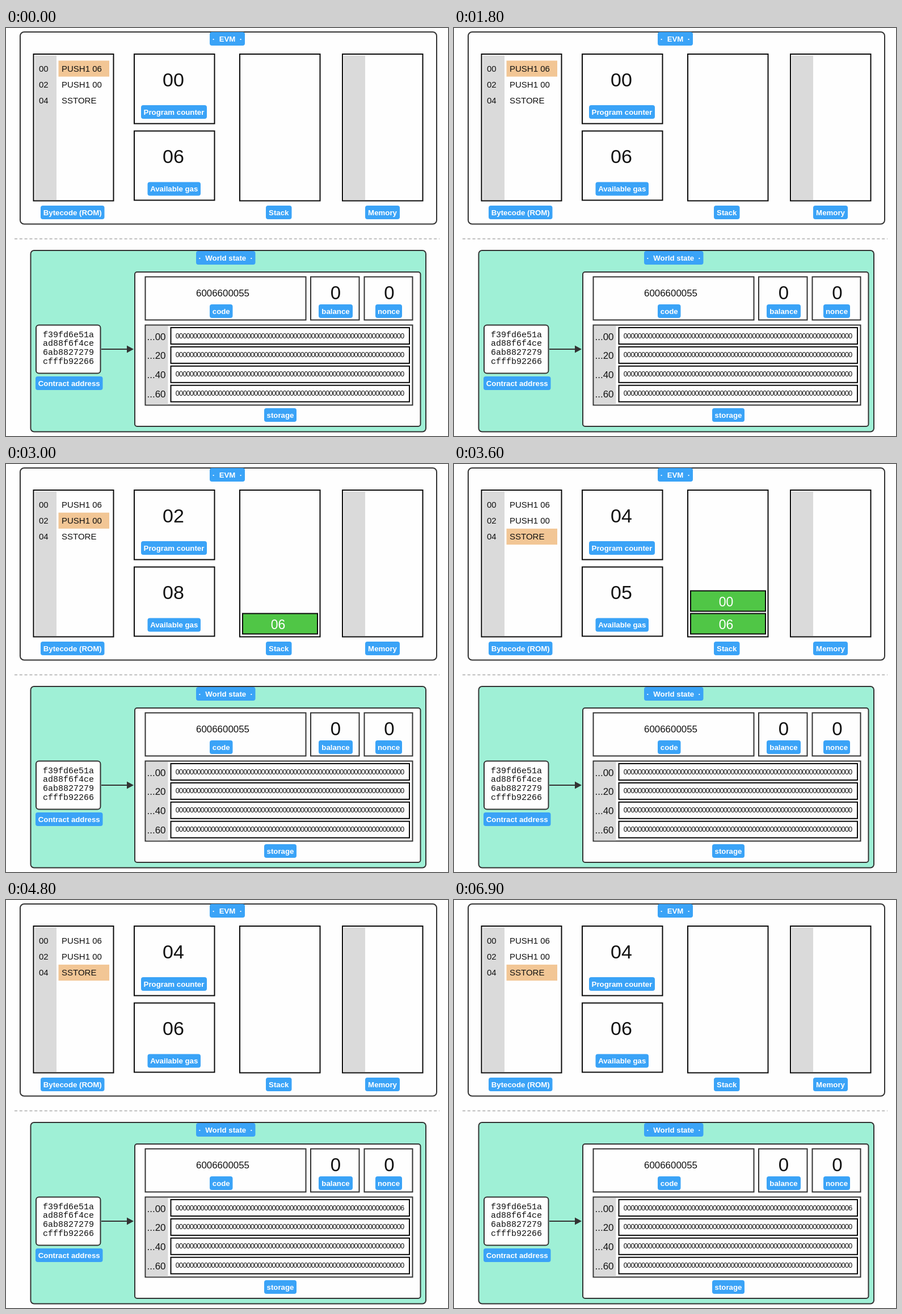
An HTML page that plays this animation: 779x719 px, repeating every 7000 ms.

```html
<!DOCTYPE html>
<html lang="en">
<head>
<meta charset="utf-8">
<title>EVM storage write</title>
<style>
  html, body { margin: 0; width: 100%; height: 100%; overflow: hidden; background: #fefefe; }
  svg { display: block; width: 779px; height: 719px; font-family: "Liberation Sans", Arial, sans-serif; }
  text { fill: #111; white-space: pre; }
  .box { fill: #fefefe; stroke: #0a0a0a; stroke-width: 2; }
  .soft { stroke: #333; }
  .world { fill: #9ff0d6; }
  .gutter { fill: #dadada; }
  .tag rect { fill: #3aa3f7; }
  .tag text { fill: #fff; font-size: 13.25px; font-weight: bold; text-anchor: middle; }
  .op { font-size: 15px; }
  .big { font-size: 34px; text-anchor: middle; }
  .mid { font-size: 33px; text-anchor: middle; }
  .code { font-size: 16.9px; text-anchor: middle; }
  .slot { font-size: 17px; }
  .word { font-size: 12.45px; letter-spacing: -.05em; }
  .addr { font: 15px "Liberation Mono", "Courier New", monospace; }
  .mark { fill: #f2c695; }
  .item rect { fill: #50c646; stroke: #0a0a0a; stroke-width: 2; }
  .item text { fill: #fff; font-size: 23px; text-anchor: middle; }

  .step { opacity: 0; animation: 7s step-end infinite; }
  .s0 { animation-name: s0; }
  .s1 { animation-name: s1; }
  .s2 { animation-name: s2; }
  .s3 { animation-name: s3; }
  @keyframes s0 { 0% { opacity: 1 } 32.857%, 100% { opacity: 0 } }
  @keyframes s1 { 0% { opacity: 0 } 32.857% { opacity: 1 } 44.286%, 100% { opacity: 0 } }
  @keyframes s2 { 0% { opacity: 0 } 44.286% { opacity: 1 } 55.714%, 100% { opacity: 0 } }
  @keyframes s3 { 0% { opacity: 0 } 55.714%, 100% { opacity: 1 } }
</style>
</head>
<body>
<svg id="stage" viewBox="0 0 779 719"></svg>
<script>
const rect = (x, y, w, h, cls, r = 0) =>
  `<rect x="${x}" y="${y}" width="${w}" height="${h}" rx="${r}" class="${cls}"/>`;
const text = (x, y, str, cls = "") => `<text x="${x}" y="${y}" class="${cls}">${str}</text>`;
const tag = (x, y, w, str) =>
  `<g class="tag">${rect(x, y, w, 24, "", 4)}${text(x + w / 2, y + 16.5, str)}</g>`;
const each = (list, fn) => list.map(fn).join("");

const zeros = "0".repeat(63);
const word = (row, last) => text(298.8, 546.5 + row * 33.9, zeros + last, "word");
const item = (row, str) =>
  `<g class="item">${rect(417, 263.5 - row * 40, 132, 36, "")}${text(479.5, 290.5 - row * 40, str)}</g>`;

const evm =
  rect(25, 7, 734, 338.5, "box soft", 7) +
  tag(359, 7, 62, "·  EVM  ·") +
  rect(48.5, 46, 141, 258.5, "box") + rect(51, 48, 38, 255, "gutter") +
  rect(226, 46, 141.5, 122.5, "box") +
  rect(226, 181.5, 141.5, 122, "box") +
  rect(412, 46, 141.5, 258.5, "box") +
  rect(593, 46, 141.5, 258.5, "box") + rect(595, 48, 38, 255, "gutter") +
  tag(238, 136, 116, "Program counter") +
  tag(249.5, 271.5, 93.5, "Available gas") +
  tag(61, 313, 112.5, "Bytecode (ROM)") +
  tag(458, 313, 45.5, "Stack") +
  tag(633, 313, 61, "Memory");

const divider =
  `<path d="M15 371.5H764" stroke="#bdbdbd" stroke-width="1.8" stroke-dasharray="5 3.8"/>`;

const world =
  rect(43.5, 392, 696.5, 319.5, "box soft world", 6) +
  tag(335, 393, 104.5, "·  World state  ·") +
  rect(227, 430, 503.5, 272, "box soft", 4) +
  rect(245.5, 438.5, 283, 76, "box soft") +
  rect(537, 438.5, 85.5, 76, "box soft") +
  rect(631.5, 438.5, 85, 76, "box soft") +
  text(382, 473, "6006600055", "code") +
  text(581, 477.5, "0", "mid") + text(675.5, 477.5, "0", "mid") +
  tag(359, 487, 40.5, "code") + tag(551, 487, 60, "balance") + tag(651, 487, 47, "nonce") +
  rect(245.5, 523.5, 471, 141, "box soft") + rect(247, 525, 38.5, 138.5, "gutter") +
  each(["00", "20", "40", "60"], (slot, i) =>
    text(248.5, 549.5 + i * 33.9, "..." + slot, "slot") +
    rect(290.5, 528 + i * 33.9, 420.5, 29, "box")) +
  each([1, 2, 3], i => word(i, 0)) +
  tag(455, 670, 57, "storage") +
  rect(53, 523.5, 113.5, 85, "box soft", 5) +
  each(["f39fd6e51a", "ad88f6f4ce", "6ab8827279", "cfffb92266"], (line, i) =>
    text(65, 544.5 + i * 15.9, line, "addr")) +
  tag(52, 614, 118.5, "Contract address") +
  `<path d="M168 566H215" stroke="#333" stroke-width="2"/><path d="M213 559.5L225 566L213 572.5Z" fill="#333"/>`;

const steps = [
  { line: 0, pc: "00", gas: "06", stack: [], last: 0 },
  { line: 1, pc: "02", gas: "08", stack: ["06"], last: 0 },
  { line: 2, pc: "04", gas: "05", stack: ["06", "00"], last: 0 },
  { line: 2, pc: "04", gas: "06", stack: [], last: 6 }
];
const states = each(steps, (s, i) => `<g class="step s${i}">` +
  rect(92.5, 57.5 + s.line * 28.2, 89.5, 28.2, "mark") +
  text(295, 102.5, s.pc, "big") + text(295, 237.5, s.gas, "big") +
  each(s.stack, (v, row) => item(row, v)) + word(0, s.last) + "</g>");

const program = each(["PUSH1 06", "PUSH1 00", "SSTORE"], (op, i) =>
  text(58, 77 + i * 28.2, "0" + i * 2, "op") + text(98, 77 + i * 28.2, op, "op"));

document.getElementById("stage").innerHTML = evm + divider + world + states + program;
</script>
</body>
</html>
```
